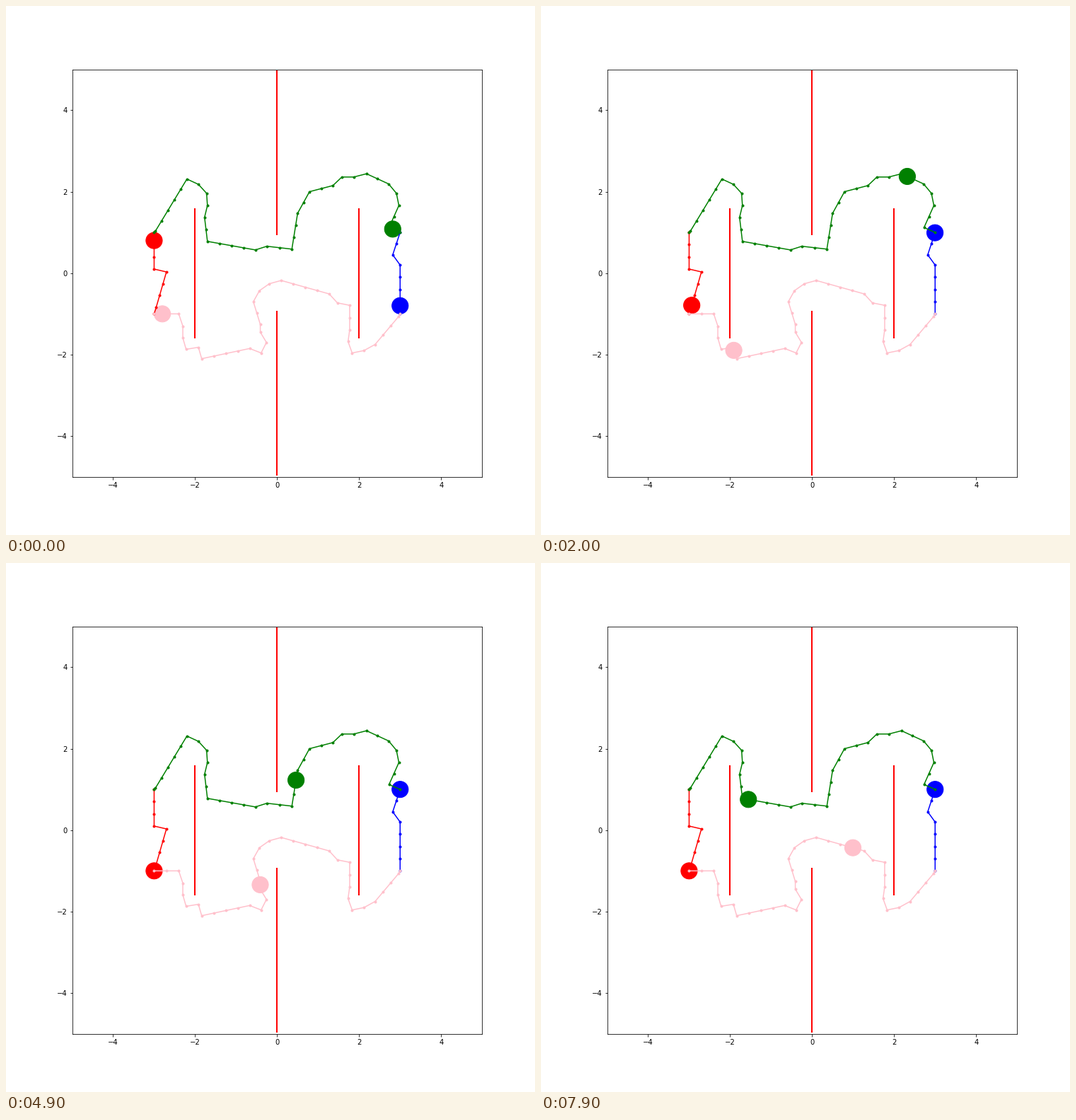
Write a matplotlib script that moves like this. It is 748 px wide and 748 px high and loops after 8000 ms.

```python
import numpy as np
import matplotlib.pyplot as plt
from matplotlib.animation import FuncAnimation
from matplotlib.patches import Circle

SIZE, DPI = 748, 72
FRAMES, INTERVAL = 80, 100
STEP = 0.3      # spacing of the path nodes
START = 0.2     # distance already covered at the first frame
RADIUS = 0.2
CUT = 0.1       # how far around a corner the robots average their position

# Corners only; the legs between them are split into even steps.
RED = [(-3, 1), (-3, 0.1), (-2.7, 0.03), (-2.95, -0.84), (-3, -1)]
BLUE = [(3, -1), (3, 0.2), (2.82, 0.45), (3, 1)]
GREEN = [(3, 1), (2.73, 1.12), (2.97, 1.66), (2.91, 1.96), (2.72, 2.19),
         (2.18, 2.44), (1.87, 2.36), (1.58, 2.36), (1.36, 2.15), (0.79, 2.0),
         (0.5, 1.47), (0.36, 0.59), (-0.25, 0.66), (-0.53, 0.57),
         (-1.7, 0.78), (-1.77, 1.37), (-1.7, 1.66), (-1.72, 1.96),
         (-1.92, 2.18), (-2.2, 2.31), (-2.97, 1.03), (-3, 1)]
PINK = [(-3, -1), (-2.4, -1), (-2.3, -1.3), (-2.3, -1.59), (-2.22, -1.87),
        (-1.92, -1.82), (-1.84, -2.1), (-0.67, -1.85), (-0.39, -1.96),
        (-0.26, -1.7), (-0.41, -1.45), (-0.41, -1.26), (-0.58, -0.7),
        (-0.43, -0.43), (-0.19, -0.26), (0.1, -0.18), (1.27, -0.51),
        (1.47, -0.73), (1.77, -0.79), (1.77, -1.39), (1.73, -1.68),
        (1.83, -1.96), (2.12, -1.9), (2.39, -1.75), (2.96, -1.07), (3, -1)]

# colour, corners, distance per frame
ROBOTS = [("red", RED, 0.093), ("blue", BLUE, 0.098),
          ("green", GREEN, 0.0865), ("pink", PINK, 0.0833)]


def split_legs(corners):
    """Place evenly spaced nodes along every leg."""
    nodes = [corners[0]]
    for a, b in zip(corners, corners[1:]):
        count = max(1, round(np.hypot(b[0] - a[0], b[1] - a[1]) / STEP))
        nodes.extend(np.linspace(a, b, count + 1)[1:])
    return np.array(nodes)


class Robot:
    def __init__(self, ax, color, corners, speed):
        self.nodes, self.speed = split_legs(corners), speed
        legs = np.hypot(*np.diff(self.nodes, axis=0).T)
        self.dist = np.concatenate([[0], np.cumsum(legs)])
        ax.plot(*self.nodes.T, ".-", color=color)
        self.disc = ax.add_patch(Circle(self.position(0), RADIUS, color=color))

    def position(self, frame):
        near = START + self.speed * frame + np.array([-CUT, 0, CUT])
        return tuple(np.interp(near, self.dist, axis).mean()
                     for axis in self.nodes.T)

    def move(self, frame):
        self.disc.center = self.position(frame)
        return self.disc


inches = (SIZE + 0.01) / DPI  # guards against rounding down a pixel
fig, ax = plt.subplots(figsize=(inches, inches), dpi=DPI)
ax.set(xlim=(-5, 5), ylim=(-5, 5))

for x, low, high in [(-2, -1.6, 1.6), (2, -1.6, 1.6),
                     (0, 0.93, 4.97), (0, -4.97, -0.93)]:
    ax.plot([x, x], [low, high], color="red", lw=2, solid_capstyle="butt")

robots = [Robot(ax, *spec) for spec in ROBOTS]


def update(frame):
    return [robot.move(frame) for robot in robots]


anim = FuncAnimation(fig, update, frames=FRAMES, interval=INTERVAL,
                     repeat=True, repeat_delay=0)
plt.show()
```
